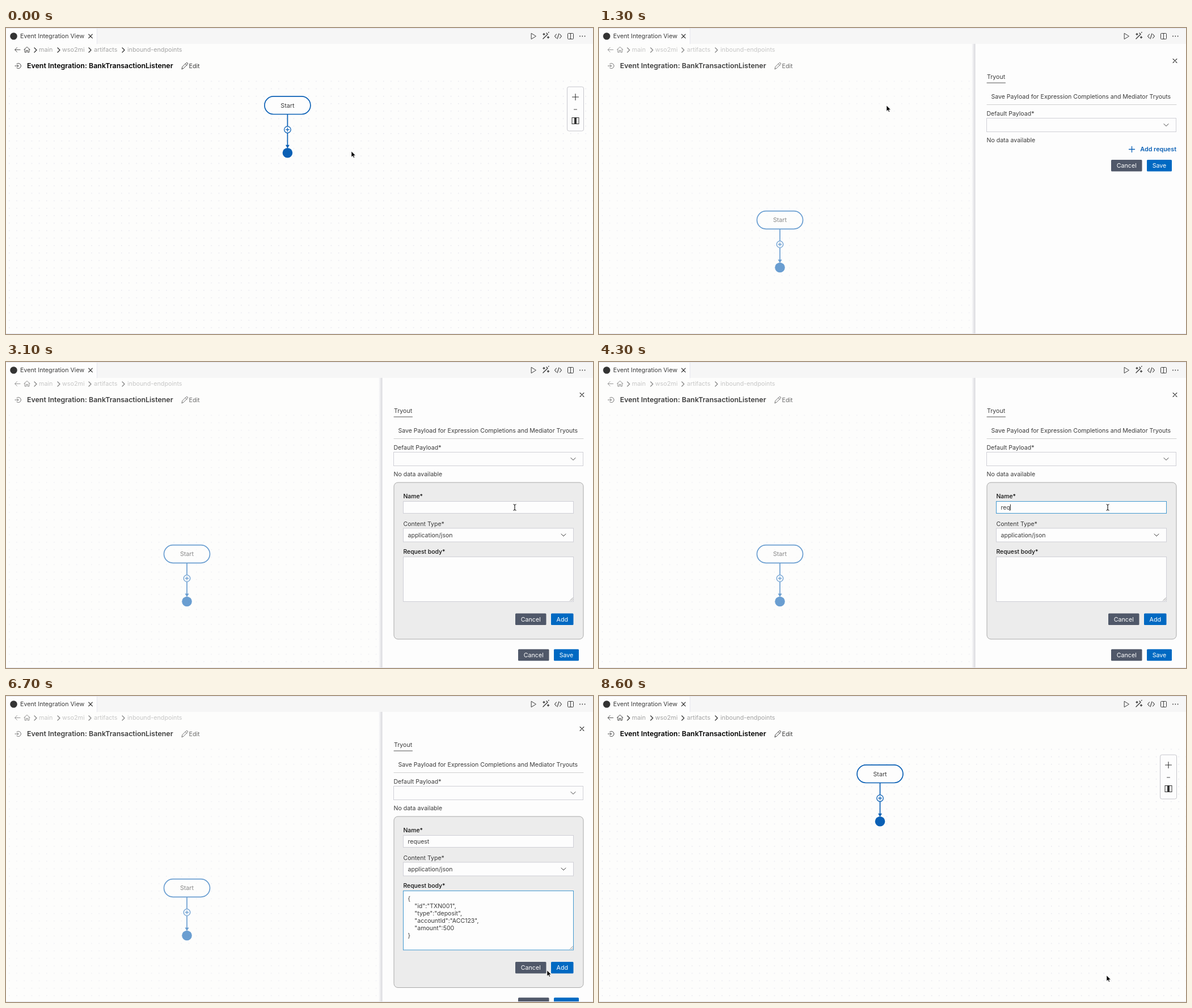
Write an HTML page that moves like this. It is 1035 px wide and 541 px high and loops after 8.7 s.

```html
<!DOCTYPE html>
<html lang="en">
<head>
<meta charset="utf-8">
<title>Event Integration View</title>
<style>
  html, body { margin: 0; width: 100%; height: 100%; overflow: hidden; background: #fdfdfc; }
  svg { display: block; width: 1035px; height: 541px; }
  text { font-family: Inter, "Open Sans", sans-serif; white-space: pre; }
</style>
</head>
<body>
<svg id="stage" viewBox="0 0 1035 541" xmlns="http://www.w3.org/2000/svg"></svg>
<script>
const LOOP = 8700, FRAME = 100;
const BLUE = '#0a60b5', INK = '#3b3b3b';
const stage = document.getElementById('stage');

// Markup helpers; text is placed by its vertical centre.
const text = (x, y, s, o = {}) =>
  `<text x="${x}" y="${y + 3.8}" font-size="${o.size || 10.55}" font-weight="${o.weight || 400}"
    fill="${o.fill || INK}" text-anchor="${o.anchor || 'start'}"${o.id ? ` id="${o.id}"` : ''}>${s}</text>`;
const rect = (x, y, w, h, fill, o = {}) =>
  `<rect x="${x}" y="${y}" width="${w}" height="${h}" fill="${fill}" rx="${o.r || 0}"
    stroke="${o.stroke || 'none'}"${o.id ? ` id="${o.id}"` : ''}/>`;
const line = (d, color = INK, w = 1, fill = 'none') =>
  `<path d="${d}" stroke="${color}" stroke-width="${w}" fill="${fill}" stroke-linecap="round" stroke-linejoin="round"/>`;
const group = (id, body, attrs = '') => `<g id="${id}" ${attrs}>${body}</g>`;
const chevronRight = x => line(`M${x} 35l4 4l-4 4`, '#333', 1.3);
const chevronDown = (x, y) => line(`M${x - 4} ${y - 2}l4 4l4-4`);
const cross = (x, y, r) => line(`M${x - r} ${y - r}l${2 * r} ${2 * r}m0 ${-2 * r}l${-2 * r} ${2 * r}`, '#222', 1.1);
const plus = (x, y, r, color, w = 1.1) => line(`M${x - r} ${y}h${2 * r}M${x} ${y - r}v${2 * r}`, color, w);
const pencil = (x, y, color) =>
  line(`M${x - 5} ${y + 5}l1-4l6.6-6.6a1.4 1.4 0 0 1 2.4 2.4l-6.6 6.6zM${x + 1.2} ${y - 4}l2.6 2.6`, color);
const button = (x, y, w, label, fill, id) =>
  rect(x, y, w, 20.5, fill, { r: 1.5, id }) + text(x + w / 2, y + 10.5, label, { fill: '#fff', anchor: 'middle', size: 10.7 });
const field = (y, h, id) => rect(700.5, y, 300, h, '#fdfdfd', { stroke: '#cfcfd6', id });
const addRequest = y => plus(939.5, y, 5, BLUE, 1.3) + text(1018, y, 'Add request', { fill: BLUE, weight: 600, size: 10.8, anchor: 'end' });
const footer = (id, saveId) => group(id, button(903, 0, 54.5, 'Cancel', '#505869') + button(966, 0, 44, 'Save', '#0069c2', saveId));

const tabBar =
  rect(0, 0, 1035, 28, '#f6f6f6') + rect(0, 0, 160, 28, '#fdfdfd') +
  line('M0 .5H1035M160.5 0V28', '#e6e6ee') +
  '<circle cx="13.5" cy="14.5" r="6.3" fill="#333"/>' +
  text(25, 14.5, 'Event Integration View', { size: 10.7 }) + cross(149, 14.5, 3.3) +
  line('M926.5 9.5l8 5l-8 5z') +
  line('M947 19l8-8M953 9l2 2M948.5 9.5v3M947 11h3M956 15v3M954.5 16.5h3M956.5 8l.5-.5', INK, 1.4) +
  line('M970.5 11l-3 3.5l3 3.5M976.5 11l3 3.5l-3 3.5M974.8 10l-2.6 9', INK, 1.1) +
  rect(990.5, 9.5, 10, 10, 'none', { stroke: INK, r: 1 }) + line('M995.5 9.5v10') +
  [1012, 1016.3, 1020.6].map(x => `<circle cx="${x}" cy="14.5" r=".9" fill="${INK}"/>`).join('');

const crumbs =
  line('M25 38.5h-9M19.5 34.5l-4 4l4 4', '#555') +
  line('M31.8 38.3l5.2-4.8l5.2 4.8M33.2 37.5v5.5h2.6v-3.5h2.4v3.5h2.6v-5.5', '#444') +
  [50, 91, 146, 205].map(chevronRight).join('') +
  [[58, 'main'], [99, 'wso2mi'], [155, 'artifacts'], [214, 'inbound-endpoints']]
    .map(([x, s]) => text(x, 38.5, s, { fill: '#a3a3a3', size: 10.75 })).join('');

const heading =
  '<path d="M18.5 64a4.5 4.5 0 1 1 0 6M15.5 67h6.5M20 65l2 2l-2 2" fill="none" stroke="#444"/>' +
  text(37, 67.5, 'Event Integration: BankTransactionListener', { size: 12.4, weight: 600, fill: '#000' }) +
  pencil(315, 67.5, '#444') + text(322.5, 67.5, 'Edit', { size: 10.7 });

const diagram =
  line('M0 16V71', BLUE, 1.7) + `<path d="M-3.5 70h7l-3.5 6z" fill="${BLUE}"/>` +
  rect(-40.5, -15.8, 81, 31.6, '#fdfdfd', { r: 15.8, stroke: `${BLUE}" stroke-width="1.7` }) +
  text(0, 0, 'Start', { anchor: 'middle', size: 10.7 }) +
  `<circle cy="43" r="5.8" fill="#fdfdfd" stroke="${BLUE}" stroke-width="1.3"/>` + plus(0, 43, 2.8, BLUE, 1.3) +
  `<circle cy="84" r="8.8" fill="${BLUE}"/>`;

const controls =
  rect(989.5, 104, 29, 78, '#fdfdfd', { r: 3, stroke: '#c6c6cc' }) + plus(1004, 122, 5.5, '#333') +
  line('M1001.5 144h5', '#444') +
  rect(998, 158.5, 12, 11, '#fdfdfd', { stroke: '#333' }) + rect(1002, 158, 4, 12, '#333');

const form =
  rect(684, 213, 334, 277, '#ececec', { r: 7, stroke: '#a9a9a9', id: 'formBox' }) +
  text(700.5, 237, 'Name*', { size: 10.4, weight: 500, fill: '#111' }) + field(246.5, 21, 'nameField') +
  text(708.5, 257, '', { id: 'nameText' }) + line('', '#222') .replace('<path', '<path id="caret"') +
  text(700.5, 286, 'Content Type*') + field(294, 24) + text(708.5, 306, 'application/json') + chevronDown(983, 306) +
  text(700.5, 335, 'Request body*', { size: 10.4, weight: 500, fill: '#111' }) + field(344.5, 79, 'bodyField') +
  group('bodyText', ['{', '    "id":"TXN001",', '    "type":"deposit",', '    "accountId":"ACC123",', '    "amount":500', '}']
    .map((s, i) => text(708.5, 358.5 + i * 12.85, s)).join('')) +
  group('formFoot', line('M994.5 422l5-5M997.5 422l2-2', '#777', .8) +
    button(898, 444.5, 54.5, 'Cancel', '#505869') + button(961, 444.5, 39.5, 'Add', '#0069c2', 'addButton'));

const saved =
  rect(684, 192, 334, 47.5, '#f0f0f0', { r: 4, stroke: '#ababab' }) +
  rect(782, 192.5, 186, 46.5, '#e0e6ea') + rect(684, 205, 97, 21, BLUE, { r: 2 }) +
  text(688, 216, 'request', { fill: '#fff' }) +
  ['{ "id":"TXN001", "type":"deposit",', '"accountId":"ACC123",', '"amount":500 }']
    .map((s, i) => text(785.5, 203.5 + i * 12.8, s)).join('') +
  pencil(979, 215.5, '#338a4f') +
  line('M993.5 211.5h9M996.5 211.5v-1.5h3v1.5M994.5 211.5l.5 9h6l.5-9M996.8 213.5v5M999.2 213.5v5', '#cf3030', 1.2);

const panel =
  rect(657, 28, 7, 513, 'url(#edge)') + rect(663.5, 28, 372, 513, '#fdfdfd') + cross(1015.5, 58, 3.4) +
  text(684, 86, 'Tryout') + line('M684 97h32.5', '#555') +
  text(691.5, 121.5, 'Save Payload for Expression Completions and Mediator Tryouts') +
  line('M684 135.5H1018', '#cfcfcf') + text(683.5, 151.5, 'Default Payload*') +
  rect(683.5, 159.5, 334, 24, '#fdfdfd', { stroke: '#cfcfd6' }) + chevronDown(1000, 171.5) +
  group('noData', text(683.5, 198.5, 'No data available')) +
  group('addFirst', addRequest(214.5)) + group('form', form) +
  group('saved', text(691.5, 171.5, 'request') + saved + addRequest(258)) + footer('footer', 'saveButton');

stage.innerHTML = `<defs>
    <pattern id="dots" x="5" y="93.5" width="13.2" height="13.2" patternUnits="userSpaceOnUse">
      <circle cx=".8" cy=".8" r=".7" fill="#d6d6e4"/></pattern>
    <linearGradient id="edge"><stop stop-color="#fdfdfd"/><stop offset="1" stop-color="#d5d5da"/></linearGradient>
  </defs>` +
  rect(0, 0, 1035, 541, '#fdfdfc') + group('grid', rect(0, 86, 1035, 455, 'url(#dots)')) +
  group('crumbs', crumbs) + group('heading', heading) + group('diagram', diagram) + group('controls', controls) +
  group('panel', panel) + tabBar + line('M0 540.5H1035', '#e6e6f0') +
  group('arrow', '<path d="M0 0V10.2L2.4 8L4 11.5L5.6 10.8L4.1 7.4H7.3Z" fill="#000" stroke="#fff" stroke-width=".6"/>') +
  group('beam', line('M-2.2-5.2Q0-5 0-3.5Q0-5 2.2-5.2M0-4V4M-2.2 5.2Q0 5 0 3.5Q0 5 2.2 5.2', '#111', 1.1)) +
  group('hand', '<path d="M-1.5-5.5q1.2-1 1.9.3V-1.6l4 .9q1.2.4 1 1.8L4.6 5.2H-.6L-4-.1q.6-1.4 2.5.7z" fill="#fff" stroke="#111" stroke-width=".9"/>');

const el = Object.fromEntries([...stage.querySelectorAll('[id]')].map(n => [n.id, n]));
const set = (id, attrs) => Object.entries(attrs).forEach(([k, v]) => el[id].setAttribute(k, v));
const show = (id, on) => set(id, { display: on ? 'inline' : 'none' });
const move = (id, x, y) => set(id, { transform: `translate(${x} ${y})` });
const progress = (t, a, b) => Math.min(1, Math.max(0, (t - a) / (b - a)));
const ease = u => u < .5 ? 4 * u ** 3 : 1 - 4 * (1 - u) ** 3;
const mix = (a, b, u) => a + (b - a) * u;

// Pointer path: time, x, y.
const route = [
  [0, 609, 218], [50, 609, 218], [400, 507, 137], [1400, 507, 137], [2000, 972, 213], [2400, 972, 213],
  [2900, 897, 257], [4900, 897, 257], [5500, 868, 398], [6200, 868, 398], [6700, 954, 485], [6850, 976, 481],
  [7250, 976, 481], [7900, 996, 292], [8200, 996, 292], [8600, 895, 494], [8700, 895, 494]
];
function pointer(t) {
  const i = Math.max(1, route.findIndex(p => p[0] > t));
  const [t0, x0, y0] = route[i - 1], [t1, x1, y1] = route[i];
  const u = ease(progress(t, t0, t1));
  return [mix(x0, x1, u), mix(y0, y1, u)];
}

function render(t) {
  const open = ease(progress(t, 450, 850)) - ease(progress(t, 8200, 8648));
  const slide = ease(progress(t, 450, 800)) - ease(progress(t, 8200, 8500));
  const dim = progress(t, 400, 700) - progress(t, 8200, 8500);
  const inForm = t >= 2300 && t < 7000, done = t >= 7000;
  const pasted = t >= 6100, grow = pasted ? 25.5 : 0;

  move('diagram', mix(496.4, 319, open), mix(136.7, 339.5, open));
  set('diagram', { opacity: mix(1, .6, dim) });
  set('heading', { opacity: mix(1, .75, dim) });
  set('crumbs', { opacity: mix(1, .6, dim) });
  set('grid', { opacity: mix(1, .7, dim) });
  show('controls', slide < .5);
  show('panel', slide > 0);
  move('panel', (1 - slide) * 380, 0);

  show('noData', !done);
  show('addFirst', !inForm && !done);
  show('form', inForm);
  show('saved', done);
  move('footer', 0, done ? 276.3 : inForm ? 507.8 + grow : 233);

  const typed = Math.floor(progress(t, 3600, 4900) * 7);
  const nameFocus = t >= 3300 && t < 5800, bodyFocus = t >= 5800;
  el.nameText.textContent = 'request'.slice(0, typed);
  set('nameField', { stroke: nameFocus ? '#4198cf' : '#cfcfd6' });
  set('bodyField', { stroke: bodyFocus ? '#4198cf' : '#cfcfd6', height: pasted ? 104.5 : 79 });
  set('formBox', { height: 277 + grow });
  const caretX = 709 + el.nameText.getComputedTextLength();
  set('caret', { d: `M${caretX} 252v10` });
  show('caret', nameFocus && t < 4900);
  show('bodyText', pasted);
  move('formFoot', 0, grow);

  const [x, y] = pointer(t);
  const overText = inForm && x > 700 && x < 1001 && ((y > 246 && y < 268) || (y > 344 && y < 424 + grow));
  const overAdd = inForm && x > 961 && y > 470 && y < 491;
  const overSave = done && t < 8300 && x > 966 && y > 276 && y < 297;
  const overLink = t < 2300 && x > 930 && y > 205;
  const overButton = overAdd || overSave || overLink;
  set('addButton', { fill: overAdd ? '#00508f' : '#0069c2' });
  set('saveButton', { fill: overSave ? '#00508f' : '#0069c2' });
  show('beam', overText);
  show('hand', overButton);
  show('arrow', !overText && !overButton);
  move('arrow', x, y);
  move('beam', x, y);
  move('hand', x + .5, y + 2);
}

const start = performance.now();
function tick() {
  const t = (performance.now() - start) % LOOP;
  render(Math.floor(t / FRAME) * FRAME);
  requestAnimationFrame(tick);
}
tick();
</script>
</body>
</html>
```
